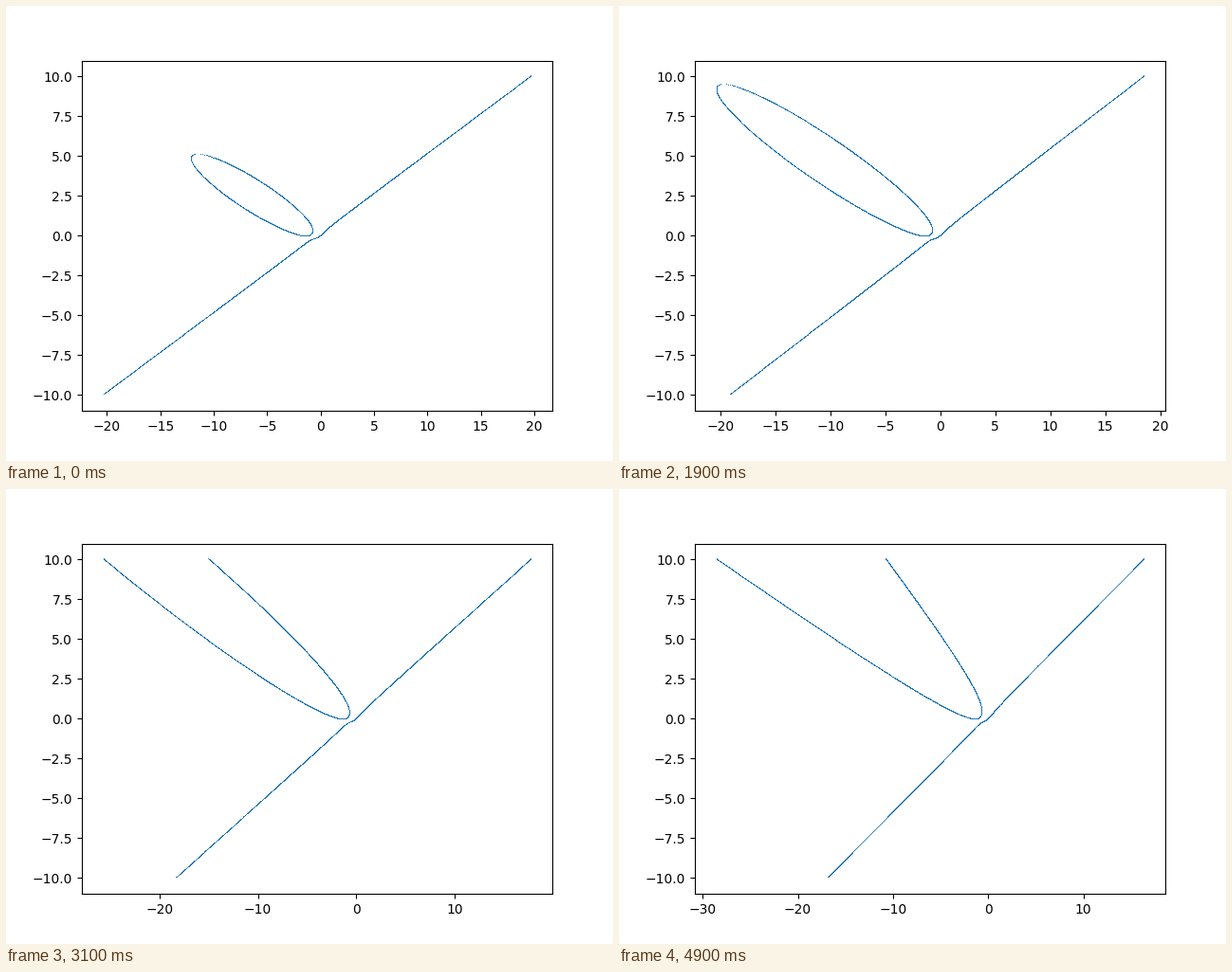
Recreate the animation shown at these times as a matplotlib script. Size 640 px wide and 480 px high, loop 5000 ms.

```python
import numpy as np
import matplotlib.pyplot as plt
from matplotlib.animation import FuncAnimation

FRAMES = 50
INTERVAL = 100
SAMPLES = np.linspace(-10, 10, 1000)

fig, ax = plt.subplots(figsize=(6.4, 4.8), dpi=100)


def real_roots(s, a, b, c):
    """Real roots of u^3 + a u^2 + b u + c for each sample s, as (s, u) pairs."""
    companion = np.zeros((s.size, 3, 3))
    companion[:, 0, 0] = -a
    companion[:, 0, 1] = -b
    companion[:, 0, 2] = -c
    companion[:, 1, 0] = companion[:, 2, 1] = 1
    roots = np.linalg.eigvals(companion)
    real = np.abs(roots.imag) < 1e-9
    return np.repeat(s, 3)[real.ravel()], roots.real[real]


def cubic_points(k):
    """Points of x^3 + 2x^2y - 3xy^2 - ky^3 + 3x^2 - 3.71xy + y^2 + 2x - 3.4y = 0."""
    s = SAMPLES
    y1, x1 = real_roots(s, 2 * s + 3,
                        -3 * s**2 - 3.71 * s + 2,
                        -k * s**3 + s**2 - 3.4 * s)
    x2, y2 = real_roots(s, (1 - 3 * s) / -k,
                        (2 * s**2 - 3.71 * s - 3.4) / -k,
                        (s**3 + 3 * s**2 + 2 * s) / -k)
    return np.concatenate([x1, x2]), np.concatenate([y1, y2])


def draw(frame):
    ax.clear()
    x, y = cubic_points(10 - 0.1 * frame)
    return ax.plot(x, y, ",", color="C0")


anim = FuncAnimation(fig, draw, frames=FRAMES, interval=INTERVAL,
                     repeat=True, repeat_delay=0)
plt.show()
```
